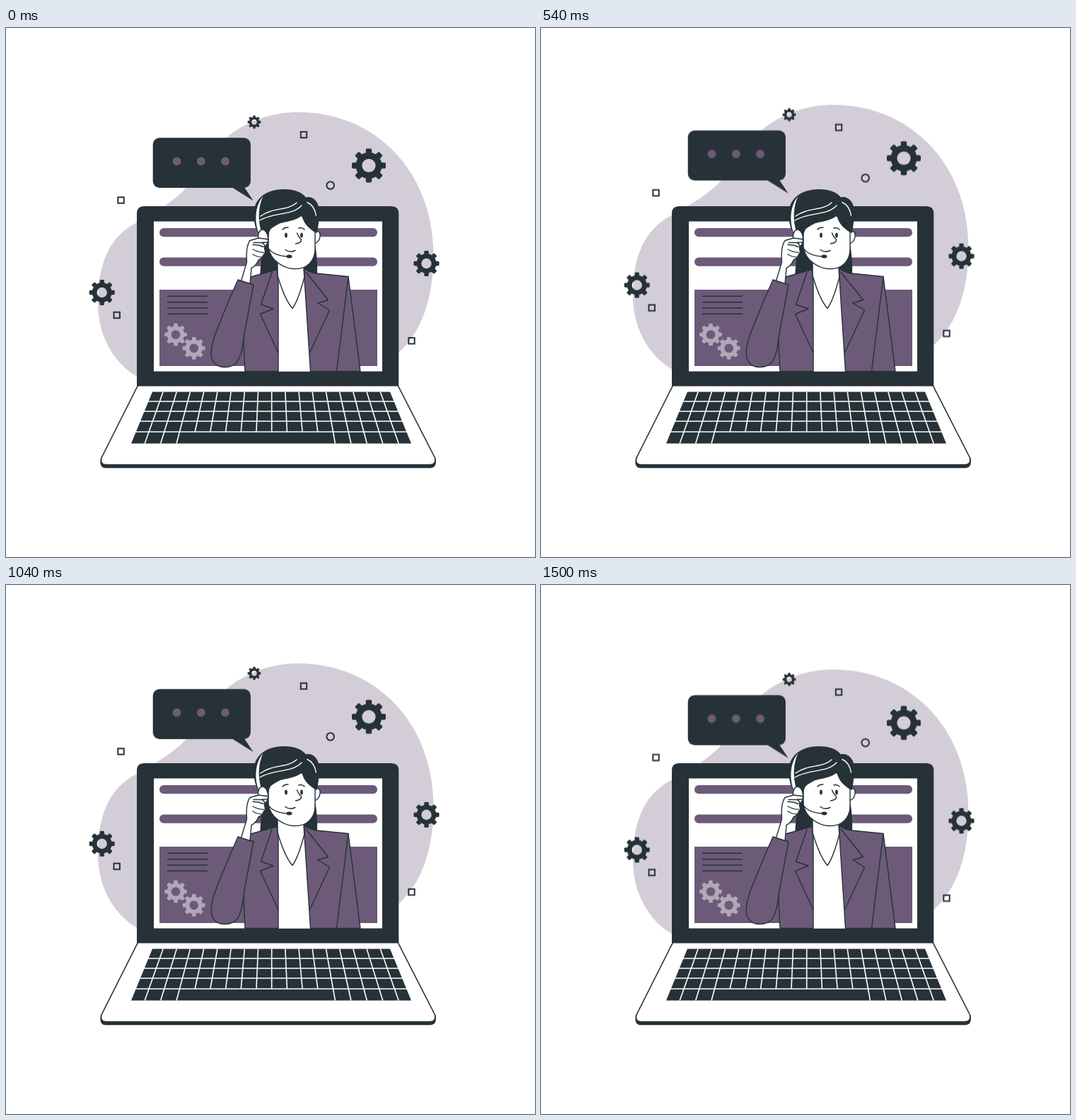
An HTML page that plays this animation: 748x748 px, repeating every 1540 ms.

```html
<!DOCTYPE html>
<html lang="en">
<head>
<meta charset="utf-8">
<title>Online support</title>
<style>
  html, body { margin: 0; width: 100%; height: 100%; overflow: hidden; background: #fff; }
  svg { display: block; width: 100vw; height: 100vh; }
  .dark { fill: #263238; }
  .main { fill: #6d5a79; }
  .tint { fill: #b2a7b8; }
  .white { fill: #fff; }
  .ink { stroke: #263238; stroke-width: 1.4; stroke-linejoin: round; stroke-linecap: round; }
  .line { fill: none; }
  .small { fill: none; stroke: #263238; stroke-width: 2; }
  .float { animation: float 1540ms linear infinite; }
  @keyframes float {
    0% { transform: translateY(0); }
    2.6% { transform: translateY(-.4px); }
    47.7% { transform: translateY(-14.27px); }
    96.4% { transform: translateY(.69px); }
    100% { transform: translateY(0); }
  }
</style>
</head>
<body>
<svg viewBox="0 0 748 748">
  <defs>
    <mask id="hole" maskUnits="userSpaceOnUse" x="-26" y="-26" width="52" height="52">
      <rect x="-26" y="-26" width="52" height="52" fill="#fff"/>
      <circle r="9.6" fill="#000"/>
    </mask>
    <g id="gear" mask="url(#hole)">
      <circle r="18.6"/>
      <rect id="teeth" x="-4.2" y="-24" width="8.4" height="48" rx="1.8"/>
      <use href="#teeth" transform="rotate(45)"/>
      <use href="#teeth" transform="rotate(90)"/>
      <use href="#teeth" transform="rotate(135)"/>
    </g>
    <rect id="box" x="-4.2" y="-4.2" width="8.4" height="8.4"/>
  </defs>

  <g class="float">
    <path fill="#d3cdd8" d="M185 493C150 472 130 432 130 390C130 340 142 297 185 275C215 258 237 245 254 227C283 196 297 156 340 136.500C366 123 393 119 413 119C520 119 604.500 200 604.500 322C604.500 380 588 430 556 458L540 493Z"/>
    <g class="dark">
      <use href="#gear" transform="translate(513 194.500)"/>
      <use href="#gear" transform="translate(594.500 333) scale(.75)"/>
      <use href="#gear" transform="translate(135.700 374) scale(.75)"/>
      <use href="#gear" transform="translate(351 133) scale(.39)"/>
      <rect x="207.700" y="155.300" width="138.200" height="70.700" rx="9.500"/>
      <path d="M319 225L349.700 244.300L335.500 223Z"/>
    </g>
    <g class="main">
      <circle cx="241.500" cy="188.500" r="5.900"/>
      <circle cx="275.800" cy="188.500" r="5.900"/>
      <circle cx="310" cy="188.500" r="5.900"/>
    </g>
    <g class="small">
      <use href="#box" x="421" y="151"/>
      <use href="#box" x="162.500" y="243.500"/>
      <use href="#box" x="156.700" y="406"/>
      <use href="#box" x="573.500" y="442.300"/>
      <circle cx="458.700" cy="222.500" r="5.300"/>
    </g>
  </g>

  <!-- laptop -->
  <path class="dark" d="M185 507V262Q185 252 195 252H545Q555.300 252 555.300 262V507Z"/>
  <path class="white" d="M209 273.500H532V485.500H209Z"/>
  <g class="main">
    <rect x="217" y="283" width="308" height="12.300" rx="6"/>
    <rect x="217" y="324.500" width="308" height="12.300" rx="6"/>
    <path d="M217 370H525V478H217Z"/>
  </g>
  <path class="ink line" d="M228.500 379.300H284.500M228.500 387.700H284.500M228.500 396H284.500M228.500 404.300H284.500"/>
  <g class="tint">
    <use href="#gear" transform="translate(240 433.500) scale(.66)"/>
    <use href="#gear" transform="translate(265.700 452.800) scale(.66)"/>
  </g>
  <path class="dark" d="M185.300 506L134 608Q131 622 141 622.300H600Q610 622 607.500 608L555.300 506Z"/>
  <path class="white" d="M186.800 506.500L136 607.500Q133 616.500 141 616.800H600Q608 616.500 605.500 607.500L553.800 506.500Z"/>
  <path class="dark" d="M207 514.500H543L573 587.500H177Z"/>
  <path id="keys" fill="none" stroke="#fff" stroke-width="1.6"/>

  <!-- agent: body -->
  <path class="dark" d="M363 300Q361 326 359 351L390 345H430L440 349Q441 328 437 306Z"/>
  <path class="white" d="M384 325H421L431 485.500H384Z"/>
  <g class="main ink">
    <path d="M385 485.500H338L335 425L346 352L383 341.500L385 360Z"/>
    <path d="M421 339.500Q429 346 439 347L484 351.500L501 485.500H430.500Z"/>
  </g>
  <path class="ink line" d="M384 330V350Q394 384 405 396.500Q413 386 422 352L421 325"/>
  <path class="ink line" d="M376 345.500L360.500 391L378 397L359.500 404.500L385 459M424 345L455.500 384.500L441 389L457.500 399L430 458M484 351.500L467.500 485.500"/>
  <path class="main ink" d="M328 356Q314 387 299 425C290 447 287 466 295 474C302 482 319 481 326 473C333 465 335 448 337 432L350 363Z"/>

  <!-- agent: head -->
  <path class="white ink" d="M436 289C440 285 445 288 444 295Q443 303 436 305Z"/>
  <path class="white ink" d="M371 285V310Q373 323 384 331.500C398 343 415 342 424 337Q437 329 437 312V275L410 262Z"/>
  <path class="dark" d="M350.500 268C348 248 361 228 393 228C408 228 418 232 424 239.500C434 237 442 246 442.500 256C444 268 441 281 440 290L437 289C428 283 420 276 418.500 265C408 275 389 273 379 280C372 285 371 291 371 299L358 292C353 285 351 276 350.500 268Z"/>
  <g fill="none" stroke="#fff" stroke-width="1.400" stroke-linecap="round">
    <path d="M360 266C378 253 398 259 411 247M359 272C379 260 404 266 418 251M426 246.500Q436 251 438.500 265"/>
  </g>
  <path class="white" d="M363.500 238C351.500 252 351.500 274 357 289L361 288C356 272 356.500 252 363.500 238Z"/>
  <g class="dark">
    <ellipse cx="396" cy="293" rx="1.900" ry="3.600"/>
    <ellipse cx="418" cy="293" rx="1.900" ry="3.600"/>
    <ellipse cx="400.500" cy="323" rx="4" ry="2.500"/>
  </g>
  <path class="ink line" d="M391 285Q394 281.500 399 282M414 283Q419 281.500 422 285M411.500 290Q413 295 417.500 299Q418 304 409.500 305M395 313.500Q401 318.500 409 314.500M368 307C373 317 383 322.500 398 323"/>
  <ellipse class="white ink" cx="363.500" cy="297" rx="7" ry="12" transform="rotate(-6 363.500 297)"/>

  <!-- agent: hand -->
  <path class="white ink" d="M332.500 357.500L340.500 331C339.500 318 341 306 345 300.500L357 297L369 298.500C372 299.500 371.500 302.500 368 303L362 303.500Q367 306 365.500 312Q368 317 364 321Q363 326 357 328Q354 336 347 339.500L345 361.500Z"/>
  <path class="ink line" d="M350 303.500H364M349 306.500Q357 306 364 309.500M349 313Q356 317 364 317.500M349 320Q355 324 362 324"/>
</svg>
<script>
  // Key gaps fan out from the centre column towards the viewer.
  const centre = 375.7, pitch = 19.2, top0 = 514.5;
  const rows = [514.5, 528, 542, 556, 571, 587.5];
  const edge = y => (y - top0) * .41;
  const at = (i, y) => `${centre + i * pitch * (1 + (y - top0) * .00231)} ${y}`;
  let d = rows.slice(1, 5).map(y => `M${206 - edge(y)} ${y}H${544 + edge(y)}`).join('');
  for (let r = 0; r < 5; r++)
    for (let i = -8; i <= 8; i++)
      if (r < 4 || i < -5 || i > 3) d += `M${at(i, rows[r])}L${at(i, rows[r + 1])}`;
  document.getElementById('keys').setAttribute('d', d);
</script>
</body>
</html>
```
